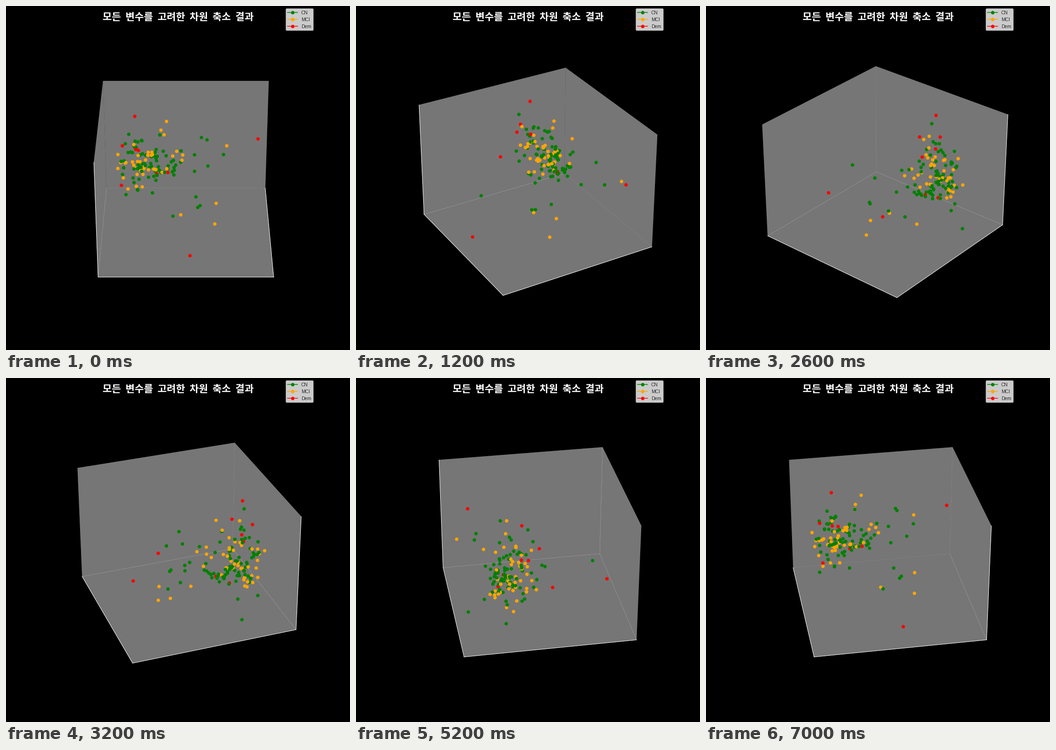
Write a matplotlib script that moves like this. It is 748 px wide and 748 px high and loops after 7200 ms.

```python
import numpy as np
import matplotlib.pyplot as plt
from matplotlib.animation import FuncAnimation
from matplotlib.patches import FancyBboxPatch

SIZE, DPI = 748, 72
FRAMES, INTERVAL = 36, 200
ELEV, DIST = 30, 10
FRONT, SIDE = 0, 100  # azimuths at which points are described

# Projection of a default 3D axes, in pixels.
SCALE = SIZE * 0.77 / 0.185
CX = SIZE * (0.5125 - 0.77 / 2 + 0.77 * 0.095 / 0.185)
CY = SIZE * (1 - 0.11 - 0.77 * 0.095 / 0.185)
ASPECT = np.array([4, 4, 3])
HALF = ASPECT * 1.8294640721620434 * 25 / 24 / np.linalg.norm(ASPECT) / 2

# Key points outside the core: front x, front y, side x.
CN = [
    (473, 323, 501), (437, 291, 508), (425, 286, 458), (439, 348, 392),
    (422, 434, 367), (417, 438, 362), (413, 415, 413), (363, 457, 279),
    (267, 279, 439), (326, 379, 556),
]
MCI = [
    (480, 304, 539), (457, 429, 392), (380, 454, 394), (454, 474, 378),
    (349, 251, 468), (337, 270, 474),
]
DEM = [
    (400, 543, 233), (548, 289, 494), (280, 240, 458), (253, 304, 453),
    (282, 312, 458), (288, 314, 419), (328, 365, 493), (352, 362, 474),
    (251, 390, 404),
]
# Name, color, key points, size of the random core.
GROUPS = [("CN", "green", CN, 72), ("MCI", "orange", MCI, 40), ("Dem", "red", DEM, 0)]


def view_axes(azim):
    """Unit vectors to the right, up and towards the camera."""
    a, e = np.radians([azim, ELEV])
    right = np.array([-np.sin(a), np.cos(a), 0])
    up = np.array([-np.sin(e) * np.cos(a), -np.sin(e) * np.sin(a), np.cos(e)])
    return right, up, np.cross(right, up)


def locate(seen):
    """Solve for 3D positions, in units of half the box."""
    x0, y0, x1 = np.asarray(seen, float).T
    right, up, near = view_axes(FRONT)
    side, _, side_near = view_axes(SIDE)
    rows, rhs = [], []
    for axis, toward, offset in ((right, near, x0 - CX), (up, near, CY - y0),
                                 (side, side_near, x1 - CX)):
        p = offset / SCALE
        rows.append(axis + p[:, None] * toward)
        rhs.append(DIST * p)
    world = np.linalg.solve(np.stack(rows, 1), np.stack(rhs, 1)[..., None])
    return world[..., 0] / HALF


rng = np.random.default_rng(11)


def core(n):
    """Dense part of the data, with a tail to the right of the front view."""
    x = 236 + rng.gamma(3.5, 21, n)
    y = rng.normal(342, 32, n)
    side = rng.normal(477, 23, n)
    return np.clip(np.column_stack([x, y, side]), (238, 280, 405), (410, 412, 525))


fig = plt.figure(figsize=(SIZE / DPI, SIZE / DPI), dpi=DPI, facecolor="black")
ax = fig.add_subplot(projection="3d", facecolor="black")
ax.set(xlim=(-1, 1), ylim=(-1, 1), zlim=(-1, 1), xticks=[], yticks=[], zticks=[])
ax.grid(False)
for axis in (ax.xaxis, ax.yaxis, ax.zaxis):
    axis.set_pane_color((0.925, 0.925, 0.925, 0.5))
    axis.pane.set_linewidth(0.3)
    axis.line.set_color("white")
    axis.line.set_linewidth(1)

seen, colors = [], []
for _, color, points, count in GROUPS:
    seen += points + core(count).tolist()
    colors += [color] * (len(points) + count)
ax.scatter(*locate(seen).T, c=colors, s=36, linewidths=1.5, depthshade=False)

# Title and legend, laid out in pixels.
page = fig.add_axes([0, 0, 1, 1])
page.set(xlim=(0, SIZE), ylim=(SIZE, 0))
page.axis("off")
title = "모든 변수를 고려한 차원 축소 결과"
page.text(SIZE / 2, 24, title.replace(" ", "  "), color="white",
          family="Noto Sans CJK JP", weight="bold", size=21.7,
          ha="center", va="center")
page.add_patch(FancyBboxPatch((608.5, 5.5), 60, 48, fc="white", ec="0.8", lw=0.3,
                              alpha=0.8, boxstyle="round,pad=0,rounding_size=2.2"))
for i, (name, color, *_) in enumerate(GROUPS):
    y = 13.5 + 15 * i
    page.plot([612.5, 634.5], [y, y], color=color, lw=1.5)
    page.plot(623.5, y, "o", color=color, ms=6.5, mew=1)
    page.text(642, y + 4, name, color="0.15", family="Liberation Sans", size=10.3)


def update(i):
    ax.view_init(elev=ELEV, azim=i * 360 / FRAMES)
    return []


anim = FuncAnimation(fig, update, frames=FRAMES, interval=INTERVAL, repeat=True,
                     init_func=lambda: update(0))
plt.show()
```
